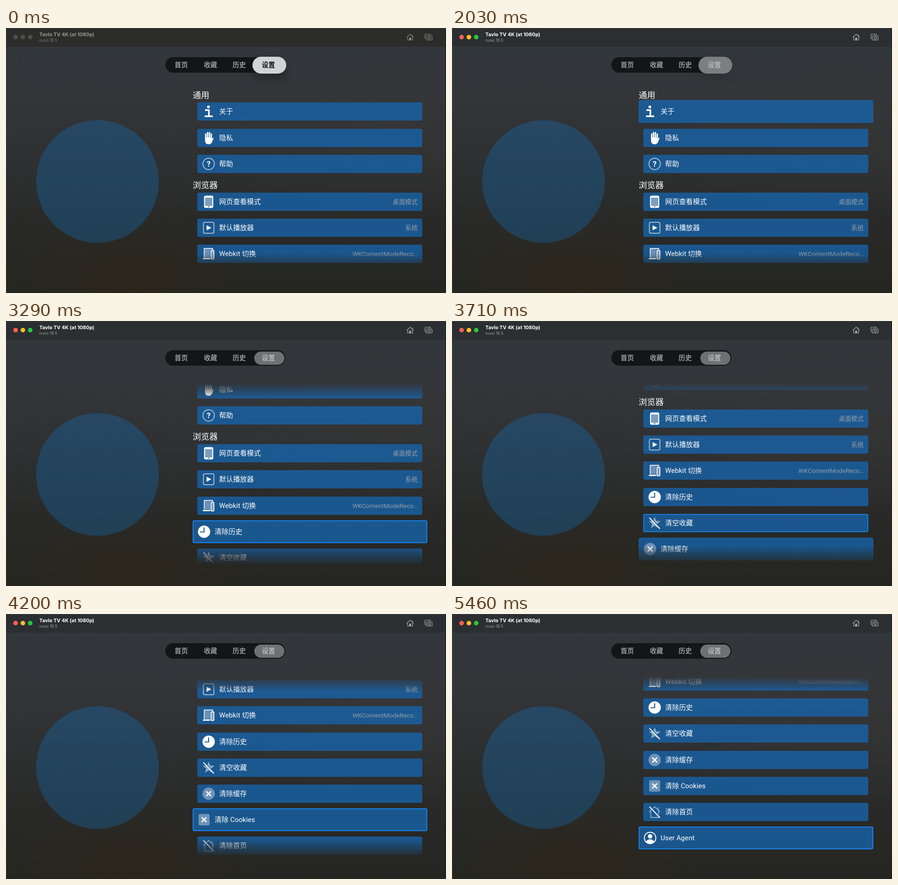
An HTML page that plays this animation: 964x581 px, repeating every 7000 ms.

```html
<!DOCTYPE html>
<html lang="zh-CN">
<head>
<meta charset="utf-8">
<title>设置</title>
<style>
html, body { margin: 0; width: 100%; height: 100%; overflow: hidden; background: #262622; }
#stage {
  position: absolute; left: 0; top: 0; width: 964px; height: 581px; overflow: hidden;
  font-family: Roboto, "Noto Sans CJK SC", "Noto Sans CJK", sans-serif; color: #fff;
  background:
    radial-gradient(ellipse 270px 130px at 270px 545px, rgba(54,36,14,.34), transparent),
    radial-gradient(ellipse 420px 190px at 850px 230px, rgba(62,58,54,.3), transparent),
    linear-gradient(#32373b 40px, #333539 150px, #2e3031 290px, #292a28 420px, #252621 581px);
}
#stage > *, .tab, .row, .row > *, .head { position: absolute; }
#frame { inset: 0; box-shadow: inset 1px 0 #3a3c3d, inset -1px 0 #141414, inset 0 1px #3c3f41; }
#bar { left: 0; top: 0; width: 964px; height: 41px; }
#name { left: 73px; top: 8px; font: 700 10.8px/14px Inter, sans-serif; white-space: nowrap; }
#version { left: 73px; top: 21px; font: 400 8.8px/12px Inter, sans-serif; color: #9a9c9d; }
#disc { left: 66px; top: 202px; width: 269px; height: 269px; border-radius: 50%; background: rgba(10,132,230,.25); }
#tabs { left: 349px; top: 64px; width: 263px; height: 34px; border-radius: 17px; background: #141516; }
#pill { border-radius: 19px; }
.tab { top: 65px; width: 60px; height: 34px; margin-left: -30px; text-align: center; color: #98999b; font-size: 14.4px; font-weight: 700; line-height: 34px; }
#list { left: 400px; top: 137px; width: 540px; height: 398px; overflow: hidden; }
.head { left: 9px; font-size: 18.3px; font-weight: 500; line-height: 26px; }
.row { box-sizing: border-box; border-radius: 4px; background: rgba(24,100,172,.78); }
.row > svg { left: 9px; top: 50%; margin-top: -16px; overflow: visible; }
.label, .value { top: 50%; height: 24px; margin-top: -12px; line-height: 24px; white-space: nowrap; }
.label { left: 48px; font-size: 15.2px; }
.value { right: 10px; font-size: 13.7px; color: #939da8; }
.ring { inset: 0; border-radius: 4px; border: 2px solid #1783ee; }
</style>
</head>
<body>
<div id="stage">
  <div id="bar"></div>
  <svg id="chrome" width="964" height="41" fill="none" stroke-width="1.2" stroke-linejoin="round">
    <g id="lights"><circle cx="21" cy="20" r="5"/><circle cx="37" cy="20" r="5"/><circle cx="53" cy="20" r="5"/></g>
    <g id="tools">
      <path d="M878 20.5L885.5 13.5L893 20.5M880 19V26.5H891V19M890.5 18V14.5"/>
      <path d="M884 26V21.5H887V26Z" fill="#a4a6a7"/>
      <path d="M920 23.5H919.5Q918 23.5 918 22V15Q918 13.5 919.5 13.5H929Q930.5 13.5 930.5 15"/>
      <path d="M922 17.5H924.5L925.5 16H929.5L930.5 17.5H932.5Q933.5 17.5 933.5 18.5V25.5Q933.5 26.5 932.5 26.5H922Q921 26.5 921 25.5V18.5Q921 17.5 922 17.5Z"/>
      <circle cx="927.3" cy="21.8" r="2.6"/>
    </g>
  </svg>
  <div id="name">Tavlo TV 4K (at 1080p)</div>
  <div id="version">nuxo 18.5</div>
  <div id="disc"></div>
  <div id="tabs"></div>
  <div id="pill"></div>
  <div id="list"></div>
  <div id="frame"></div>
</div>
<script>
const LOOP = 7000, STEP = 70;
const ACTIVE_AT = 980, MAX_SCROLL = 347;
const $ = id => document.getElementById(id);
const clamp = v => Math.max(0, Math.min(1, v));
const mix = (a, b, k) => a + (b - a) * k;
const rgb = (a, b, k) => `rgb(${a.map((v, i) => Math.round(mix(v, b[i], k)))})`;

const slash = `<path d="M-10-12L12 11" stroke="#1e5a92" stroke-width="2.4"/>
  <path d="M-11-11L11 12" stroke="#fff" stroke-width="2" stroke-linecap="round"/>`;
const cross = '<path d="M-4.5-4.5L4.5 4.5M4.5-4.5L-4.5 4.5" stroke="#fff" stroke-width="2.6" stroke-linecap="round"/>';
const starPoints = Array.from({ length: 10 }, (_, i) => {
  const r = i % 2 ? 5.8 : 13.5, a = i * Math.PI / 5;
  return [r * Math.sin(a), -r * Math.cos(a)].map(v => v.toFixed(1));
}).join(' ');

const icons = {
  info: '<circle cx="-.5" cy="-10" r="3" fill="#fff"/><path d="M-8-3H.5V10M-9 10.5H9" stroke="#fff" stroke-width="3.6"/>',
  hand: `<path d="M-6.4 2V-8.5M-2.4 0V-11.8M1.7 0V-11.8M5.7 2V-8.5" stroke="#fff" stroke-width="3" stroke-linecap="round"/>
    <path d="M-7.9-1H7.2V3L9-.5Q11-1 10.6 1L7.5 9Q5 14 0 14Q-8 14-7.9 6Z" fill="#fff"/>`,
  help: `<circle r="12.6" stroke="#a6bcd3" stroke-width="2"/>
    <text y="6" text-anchor="middle" font-size="17" font-weight="700" fill="#fff">?</text>`,
  phone: `<rect x="-9" y="-12.5" width="18" height="25" rx="2.5" fill="#7c9dbf" stroke="#fff" stroke-width="2.2"/>
    <path d="M-9-10.5H9M-9 10.5H9" stroke="#fff" stroke-width="3"/><circle cy="10.8" r="1.3" fill="#1e5a92"/>`,
  player: '<rect x="-11.5" y="-12" width="23" height="24" rx="3" stroke="#a6bcd3" stroke-width="2"/><path d="M-4.5-5.5L6 0L-4.5 5.5Z" fill="#fff"/>',
  devices: `<path d="M-9.5 8V-11.5H8.5V-9" stroke="#fff" stroke-width="2"/>
    <path d="M-8.5-10.5H7.5V-9H3V8H-8.5Z" fill="#6b91b8"/><path d="M-12.5 10.5H3" stroke="#fff" stroke-width="3"/>
    <rect x="5" y="-7.5" width="6.5" height="19" rx="1.5" fill="#7c9dbf" stroke="#fff" stroke-width="1.8"/>`,
  clock: '<circle r="13.5" fill="#fff"/><path d="M0-8.5V.5H-8" stroke="#1e5a92" stroke-width="2.2" stroke-linecap="round"/>',
  star: `<polygon points="${starPoints}" fill="#8eabc8"/>${slash}`,
  round: `<circle r="13.5" fill="#6f93b8"/>${cross}`,
  square: `<rect x="-12" y="-12.5" width="24" height="25" rx="3" fill="#6f93b8"/>${cross}`,
  house: `<path d="M-12 0L0-11.5L12 0M-8.5-2V12H8.5V-2M7.5-5V-10" stroke="#8eabc8" stroke-width="1.8"/>${slash}`,
  person: `<circle r="12.6" stroke="#fff" stroke-width="2"/><circle cy="-3.5" r="4.8" fill="#fff"/>
    <path d="M-9 8Q-6 3 0 3T9 8Q5 12 0 12T-9 8Z" fill="#fff"/>`
};

const items = [
  ['info', '关于'], ['hand', '隐私'], ['help', '帮助'],
  ['phone', '网页查看模式', '桌面模式'], ['player', '默认播放器', '系统'],
  ['devices', 'Webkit 切换', 'WKContentModeReco…'],
  ['clock', '清除历史'], ['star', '清空收藏'], ['round', '清除缓存'],
  ['square', '清除 Cookies'], ['house', '清除首页'], ['person', 'User Agent']
];
// moment at which each row takes focus
const focusAt = [2030, 2240, 2380, 2590, 2800, 2940, 3150, 3430, 3710, 3990, 4270, 4620];
const scrollKeys = [[2520, 0], [2730, 16.6], [3290, 90.5], [3710, 166.7], [4200, 272.6], [4620, 332], [5250, MAX_SCROLL]];

function add(parent, cls, html) {
  const el = document.createElement('div');
  el.className = cls;
  el.innerHTML = html;
  parent.append(el);
  return el;
}

const tabs = ['首页', '收藏', '历史', '设置'].map((text, i) => {
  const el = add($('stage'), 'tab', text);
  el.style.left = [384, 448, 511, 575][i] + 'px';
  return el;
});
const heads = [['通用', 147.5], ['浏览器', 344.5]].map(([text, y]) => ({ el: add($('list'), 'head', text), y }));
const rows = items.map(([icon, label, value = ''], i) => {
  const el = add($('list'), 'row',
    `<svg width="32" height="32" viewBox="-16 -16 32 32" fill="none">${icons[icon]}</svg>
     <span class="label">${label}</span><span class="value">${value}</span><div class="ring"></div>`);
  return { el, ring: el.lastChild, y: 183.4 + i * 57.2 + (i > 2 ? 25.6 : 0) };
});

function scrollAt(t) {
  const k = scrollKeys, last = k.length - 1;
  if (t <= k[0][0]) return 0;
  if (t >= k[last][0]) return MAX_SCROLL;
  const i = k.findIndex(p => p[0] > t) - 1;
  const slope = j => j < 1 || j === last ? 0 : (k[j + 1][1] - k[j - 1][1]) / (k[j + 1][0] - k[j - 1][0]);
  const d = k[i + 1][0] - k[i][0], u = (t - k[i][0]) / d, v = 1 - u;
  return v * v * (1 + 2 * u) * k[i][1] + u * u * (3 - 2 * u) * k[i + 1][1]
    + d * u * v * (v * slope(i) - u * slope(i + 1));
}

function drawChrome(t) {
  const on = clamp((t - ACTIVE_AT + 2 * STEP) / (2 * STEP));
  $('bar').style.background = rgb([44, 44, 43], [43, 47, 49], on);
  $('name').style.color = rgb([150, 150, 150], [255, 255, 255], on);
  $('version').style.opacity = mix(.7, 1, on);
  $('tools').style.stroke = rgb([135, 135, 135], [170, 172, 173], on);
  [[255, 95, 87], [254, 188, 46], [40, 200, 64]].forEach((color, i) => {
    $('lights').children[i].style.fill = rgb([78, 78, 78], color, on);
  });
}

function drawTab(t) {
  const left = t >= focusAt[0], k = clamp((t - focusAt[0]) / 140);
  const style = $('pill').style;
  style.left = mix(540, 543.5, k) + 'px';
  style.top = mix(63, 67, k) + 'px';
  style.width = mix(73.5, 66, k) + 'px';
  style.height = mix(37, 28.5, k) + 'px';
  style.background = left ? rgb([125, 126, 128], [111, 112, 114], k) : '#d2d3d5';
  style.boxShadow = `0 10px 18px rgba(0,0,0,${left ? .1 * (1 - k) : .3})`;
  tabs[3].style.color = left ? '#b7b8b9' : '#0c0c0d';
}

function drawList(t) {
  const scroll = scrollAt(t), top = $('list').offsetTop;
  const focus = focusAt.filter(at => at <= t).length - 1;
  heads.forEach(h => h.el.style.top = h.y - 13 - top - scroll + 'px');
  rows.forEach(({ el, ring, y }, i) => {
    const grow = i === focus ? 1 : 0;
    el.style.left = 19 - 10 * grow + 'px';
    el.style.width = 493 + 20.5 * grow + 'px';
    el.style.height = 40 + 10 * grow + 'px';
    el.style.top = y - 20 - 5 * grow - top - scroll + 'px';
    const shown = clamp((t - focusAt[i]) / 140 + .1);
    const gone = i < focus ? clamp((t - focusAt[i + 1]) / 140 + .15) : 0;
    ring.style.opacity = shown * (1 - gone);
  });
  const head = Math.min(32, scroll * 2), foot = Math.min(42, (MAX_SCROLL - scroll) * 1.5);
  const mask = `linear-gradient(rgba(0,0,0,${head ? 0 : 1}), #000 ${head}px, #000 ${398 - foot}px, rgba(0,0,0,${foot ? 0 : 1}))`;
  $('list').style.webkitMaskImage = mask;
  $('list').style.maskImage = mask;
}

function render(now) {
  const t = Math.floor((now % LOOP) / STEP) * STEP;
  drawChrome(t);
  drawTab(t);
  drawList(t);
}

const start = performance.now();
function tick() {
  render(performance.now() - start);
  requestAnimationFrame(tick);
}
tick();
</script>
</body>
</html>
```
